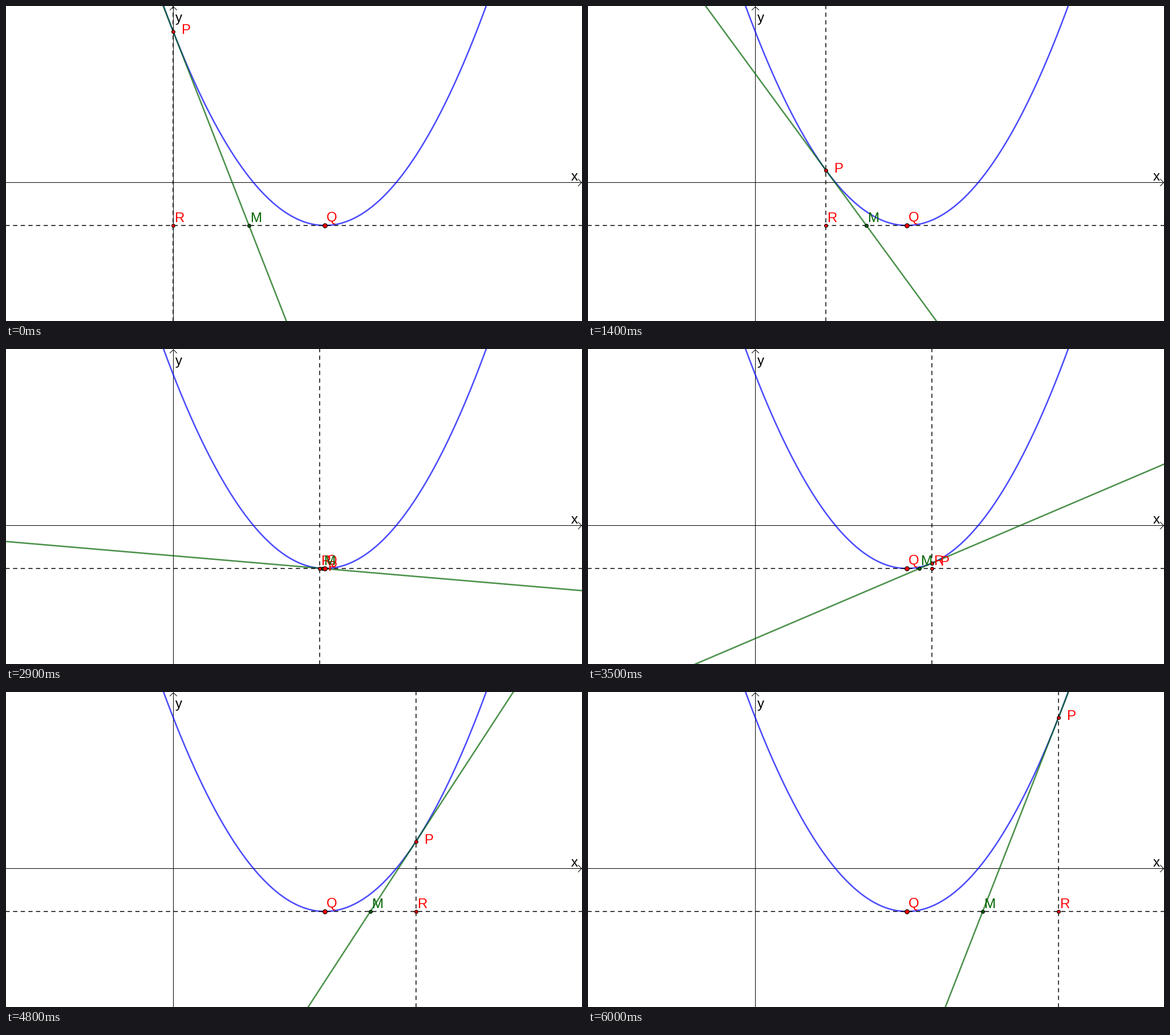
Recreate the animation shown at these times as a matplotlib script. Size 1010 by 554 pixels, loop 6.1 s.

```python
import numpy as np
import matplotlib.pyplot as plt
from matplotlib.animation import FuncAnimation

W, H, DPI = 1010, 554, 100
FRAMES, INTERVAL = 61, 100
PX = 72 / DPI  # points per pixel

X0, Y0 = 293.1, 310.1       # axes origin
XV, YV = 559.1, 386.0       # parabola vertex Q
A = 341.4 / (XV - X0) ** 2  # curvature in pixels

RED, GREEN, BLUE = "#ff0000", "#006400", "#0000ff"
DASH_WIDTH, DASH, GAP = 1.5, 7.45, 5.95
MARGIN = 5                  # dashed lines start this far outside the stage

plt.rcParams["font.family"] = "Liberation Sans"
fig = plt.figure(figsize=(W / DPI, H / DPI), dpi=DPI, facecolor="white")
ax = fig.add_axes([0, 0, 1, 1])
ax.set_xlim(0, W)
ax.set_ylim(H, 0)
ax.axis("off")


def curve(x):
    return YV - A * (x - XV) ** 2


def stroke(xs, ys, color, width, z, **kw):
    return ax.plot(xs, ys, color=color, lw=width * PX, zorder=z, **kw)[0]


def dashed(xs, ys):
    return stroke(xs, ys, "black", DASH_WIDTH, 4, dash_capstyle="butt",
                  dashes=(DASH / DASH_WIDTH, GAP / DASH_WIDTH))


def dot(color, size, z):
    return ax.plot([XV], [YV], "o", ms=size * PX, mfc=color, mec="black",
                   mew=1.1 * PX, zorder=z, snap=False)[0]


def label(text, x, y, color, z):
    return ax.text(x, y, text, color=color, fontsize=24 * PX, zorder=z,
                   ha="left", va="baseline")


# Axes with open arrowheads
xa, ya = int(X0) + 0.5, int(Y0) + 0.5
stroke([0, W], [ya, ya], "black", 1, 1, snap=False)
stroke([xa, xa], [1, H], "black", 1, 1, snap=False)
stroke([W - 6.5, W - 0.7, W - 6.5], [ya - 6, ya, ya + 6], "black", 1, 1)
stroke([xa - 6, xa, xa + 6], [7, 1.2, 7], "black", 1, 1)
label("x", 991, 307, "black", 1)
label("y", 297, 28, "black", 1)

# Fixed curve, vertex and its horizontal
xs = np.linspace(260, 860, 601)
stroke(xs, curve(xs), BLUE, 2.6, 2, alpha=0.7)
dashed([-MARGIN, W + MARGIN], [YV, YV])
dot(RED, 7.6, 8)
label("Q", XV + 3, YV - 7, RED, 10)

# Moving parts
tangent = stroke([], [], GREEN, 2.6, 3, alpha=0.7)
vertical = dashed([], [])
dots = {"M": dot(GREEN, 5.8, 6), "R": dot(RED, 5.8, 7), "P": dot(RED, 5.8, 9)}
offsets = {"M": (3.2, -6), "R": (3.2, -6), "P": (14.8, 4)}
labels = {"R": label("R", 0, 0, RED, 11),
          "P": label("P", 0, 0, RED, 12),
          "M": label("M", 0, 0, GREEN, 13)}


def update(i):
    px = X0 + 2 * (XV - X0) * i / (FRAMES - 1)
    py = curve(px)
    slope = -2 * A * (px - XV)
    ends = np.array([-50, W + 50])
    tangent.set_data(ends, py + slope * (ends - px))
    vertical.set_data([px, px], [H + MARGIN, -MARGIN])
    places = {"P": (px, py), "R": (px, YV), "M": ((px + XV) / 2, YV)}
    for name, (x, y) in places.items():
        dx, dy = offsets[name]
        dots[name].set_data([x], [y])
        labels[name].set_position((x + dx, y + dy))
    return [tangent, vertical, *dots.values(), *labels.values()]


anim = FuncAnimation(fig, update, frames=FRAMES, interval=INTERVAL,
                     repeat=True, repeat_delay=0, blit=False)
plt.show()
```
